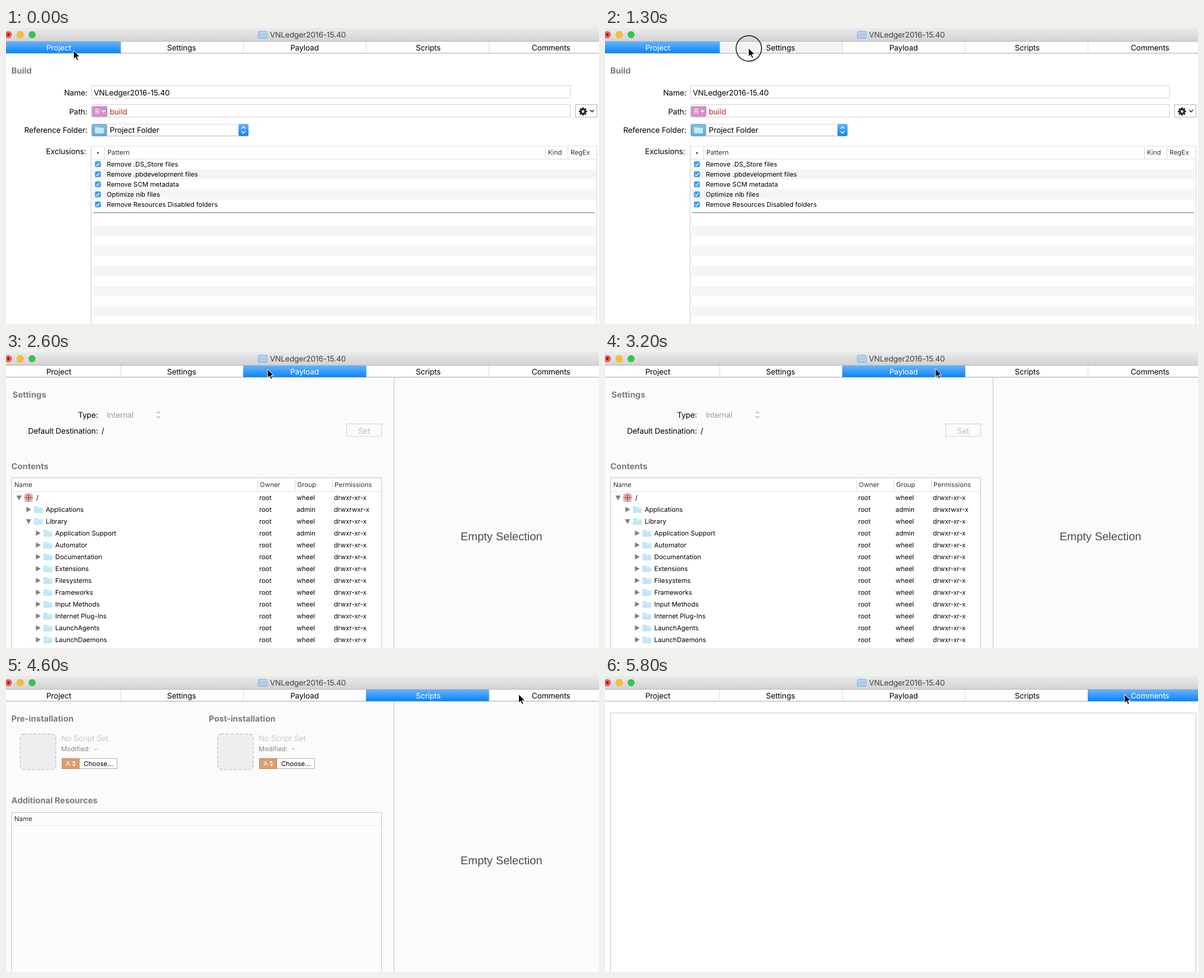
Write an HTML page that moves like this. It is 1000 by 500 pixels and loops after 6000 ms.

```html
<!DOCTYPE html>
<html lang="en">
<head>
<meta charset="utf-8">
<title>Package project</title>
<style>
html, body { margin: 0; width: 100%; height: 100%; overflow: hidden; background: #fff; }
svg { display: block; width: 1000px; height: 500px; }
text { font-family: Inter, "Open Sans", sans-serif; white-space: pre; text-rendering: geometricPrecision; }
</style>
</head>
<body>
<svg id="stage" viewBox="0 0 1000 500" xmlns="http://www.w3.org/2000/svg"></svg>
<script>
const LOOP = 6000, STEP = 100;
const PROJECT = 'VNLedger2016';
const TABS = [['Project', 0, 193, 89], ['Settings', 193, 400, 296], ['Payload', 400, 607, 503.5],
  ['Scripts', 607, 814, 712], ['Comments', 814, 1000, 919]];

// Drawing helpers: text is placed by the middle of its capitals.
const text = (x, y, s, o = {}) => {
  const size = o.size || 13;
  return `<text x="${x}" y="${y + size * 0.36}" font-size="${size}" fill="${o.fill || '#000'}"
    text-anchor="${o.anchor || 'start'}" font-weight="${o.weight || 400}"
    letter-spacing="${size === 13 ? -0.14 : 0}" ${o.attrs || ''}>${s}</text>`;
};
const small = (x, y, s, fill = '#000') => text(x, y, s, { size: 11, fill });
const label = (x, y, s) => text(x, y, s, { anchor: 'end' });
const heading = (x, y, s) => text(x, y, s, { size: 14, weight: 700, fill: '#7c7c7c' });
const rect = (x, y, w, h, fill, attrs = '') =>
  `<rect x="${x}" y="${y}" width="${w}" height="${h}" fill="${fill}" ${attrs}/>`;
const box = (x, y, w, h, stroke = '#d2d2d2', fill = '#fff') =>
  rect(x + .5, y + .5, w - 1, h - 1, fill, `stroke="${stroke}"`);
const path = (d, stroke, width = 1, fill = 'none') =>
  `<path d="${d}" fill="${fill}" stroke="${stroke}" stroke-width="${width}"/>`;
const hline = (x1, x2, y, c) => path(`M${x1} ${y}H${x2}`, c);
const vline = (x, y1, y2, c) => path(`M${x} ${y1}V${y2}`, c);
const list = (n, fn) => Array.from({ length: n }, (_, i) => fn(i)).join('');

const chevrons = (x, y, c, w = 1.4) =>
  path(`M${x - 3.2} ${y - 2.3}l3.2 -3.2l3.2 3.2M${x - 3.2} ${y + 2.3}l3.2 3.2l3.2 -3.2`, c, w);
const field = (x, y, w, h, s) => box(x, y, w, h) + text(x + 4, y + 12, s);
const popup = (x, y, w, s, tx) =>
  rect(x + .5, y + .5, w - 1, 19.5, '#fff', 'rx="3" stroke="#dcdcdc"') +
  hline(x + 2, x + w - 2, y + 20.5, '#c6c6c6') +
  rect(x + w - 17, y, 17, 20.5, 'url(#cap)', 'rx="3"') +
  chevrons(x + w - 8.5, y + 10.2, '#fff') + text(tx, y + 10.5, s);
const check = (x, y, size, on) => on
  ? rect(x, y, size, size, '#419df5', 'rx="2.5"') +
    path(`M${x + size * .23} ${y + size * .53}l${size * .2} ${size * .23}l${size * .34} ${-size * .5}`, '#fff', size / 8)
  : rect(x + .5, y + .5, size - 1, size - 1, '#fff', 'rx="2.5" stroke="#c8c8c8"');
const folder = (x, y, w = 15, h = 11) =>
  rect(x, y, w * .45, 3, '#aeddf3', 'rx="1"') + rect(x, y + 1.5, w, h - 1.5, '#c0e7f9', 'rx="1"') +
  hline(x, x + w, y + 3, '#daf1fb');
const triangle = (x, y, open) => path(open
  ? `M${x - 4.5} ${y - 3.5}h9l-4.5 8z` : `M${x - 3.5} ${y - 4.5}v9l8 -4.5z`, 'none', 0, '#7d7d7d');

function gear(x, y) {
  const teeth = list(8, i => rect(x - 1.4, y - 7, 2.8, 4, '#222', `transform="rotate(${i * 45} ${x} ${y})"`));
  return teeth + `<circle cx="${x}" cy="${y}" r="3.7" fill="none" stroke="#222" stroke-width="2.8"/>`;
}

function projectPage() {
  const rows = ['Remove .DS_Store files', 'Remove .pbdevelopment files', 'Remove SCM metadata',
    'Optimize nib files', 'Remove Resources Disabled folders'];
  return heading(9, 72, 'Build') +
    label(137, 109, 'Name:') + field(144, 97, 808, 22, PROJECT + '-15.40') +
    label(137, 141, 'Path:') + box(144, 129, 808, 22) +
    rect(145, 132, 26, 18, '#d68fcb', 'rx="2"') + text(150, 141, 'R', { size: 12, fill: '#fff' }) +
    path('M161 139.3h7l-3.5 3.8z', 'none', 0, '#fff') + text(175, 141, 'build', { fill: '#b5281c' }) +
    box(960, 129, 37, 22, '#b4b4b4') + gear(973, 141) + path('M985 138.5l3.3 3.3l3.3 -3.3', '#222', 1.5) +
    label(137, 172, 'Reference Folder:') + popup(144, 162, 265, 'Project Folder', 175) +
    rect(145, 162.5, 25, 20, 'url(#well)', 'rx="2" stroke="#7ba3c4"') + folder(150, 167) +
    label(135, 208, 'Exclusions:') +
    hline(143, 997, 199.5, '#e3e3e3') + vline(143.5, 199, 500, '#c9c9c9') + vline(996.5, 199, 500, '#d5d5d5') +
    hline(144, 996, 221.5, '#dedede') +
    [166.5, 909.5, 947.5].map(x => vline(x, 201, 221, '#d8d8d8')).join('') +
    `<circle cx="155" cy="211" r="1.5" fill="#333"/>` +
    small(171, 210, 'Pattern', '#333') + small(914, 210, 'Kind', '#333') + small(952, 210, 'RegEx', '#333') +
    rows.map((s, i) => {
      const y = 230 + 17 * i;
      return (i % 2 ? rect(146, y - 8.5, 849, 17, '#f5f5f5') : '') + check(150, y - 5, 10, true) + small(170, y, s);
    }).join('') +
    rect(147, 311, 846, 1.5, '#9b9b9b') +
    list(5, i => rect(146, 334 + 34 * i, 849, 17, '#f5f5f5'));
}

function settingsPage() {
  const options = ['Require admin password for installation', 'Relocatable',
    'Overwrite directory permissions', 'Follow symbolic links'];
  return heading(9, 72, 'Tag') +
    label(100, 108, 'Identifier:') + field(108, 96, 889, 22, `com.mosswhim.pkg.${PROJECT}-1540`) +
    label(100, 139, 'Version:') + field(108, 128, 255, 22, '1.0') +
    rect(0, 170, 1000, 105, '#f2f2f2') + heading(9, 200, 'Post-installation Behavior') +
    label(100, 245, 'On Success:') + popup(108, 235, 183, 'Do Nothing', 117) +
    heading(9, 305, 'Options') +
    options.map((s, i) => check(108, 329 + 22 * i, 14, i === 0) + text(126, 336 + 22 * i, s)).join('');
}

const inspector = () => rect(0, 43, 1000, 457, '#fbfbfb') + vline(654.5, 43, 500, '#c4c4c4') +
  `<text x="766.5" y="318" font-size="19.1" fill="#4c4c4c" style="font-family:'Liberation Sans',sans-serif">Empty Selection</text>`;

function payloadPage() {
  const names = ['/', 'Applications', 'Library', 'Application Support', 'Automator', 'Documentation', 'Extensions',
    'Filesystems', 'Frameworks', 'Input Methods', 'Internet Plug-Ins', 'LaunchAgents', 'LaunchDaemons'];
  const row = (name, i) => {
    const y = 246 + 20 * i, depth = Math.min(i, 2) - (i === 2 ? 1 : 0), x = 22 + 16 * depth;
    const admin = i === 1 || i === 3;
    const icon = i ? folder(x + 9, y - 5)
      : rect(32, 240, 12, 12, '#f3d9d2', 'stroke="#a8a09c"') +
        path('M30 246h16M38 238v16M34.5 242.5h7v7h-7z', '#c4503e', 1.2) + rect(36.5, 244.5, 3, 3, '#b83827');
    return triangle(x, y, i === 0 || i === 2) + icon + small(i ? x + 29 : 51, y, name) + small(427, y, 'root') +
      small(490, y, admin ? 'admin' : 'wheel') + small(553, y, i === 1 ? 'drwxrwxr-x' : 'drwxr-xr-x');
  };
  return inspector() + heading(11, 72, 'Settings') +
    label(155, 106, 'Type:') + text(170, 106, 'Internal', { fill: '#9c9c9c' }) + chevrons(257, 106, '#a5a5a5', 1.2) +
    label(155, 133, 'Default Destination:') + text(161, 133, '/') +
    box(574, 121, 60, 22, '#d4d4d4', '#fbfbfb') + text(604, 133, 'Set', { fill: '#bdbdbd', anchor: 'middle' }) +
    heading(9, 193, 'Contents') + box(9, 212, 625, 300, '#c6c6c6') + hline(10, 633, 235.5, '#e2e2e2') +
    [424.5, 487.5, 550.5].map(x => vline(x, 215, 234, '#d8d8d8')).join('') +
    small(14, 224, 'Name', '#333') + small(428, 224, 'Owner', '#333') +
    small(491, 224, 'Group', '#333') + small(554, 224, 'Permissions', '#333') + names.map(row).join('');
}

function scriptsPage() {
  const slot = (x, title) => heading(x, 72, title) +
    rect(x + 15, 98, 60, 60, '#eeeeee', 'rx="6" stroke="#c9c9c9" stroke-width="1.5" stroke-dasharray="5 3"') +
    text(x + 84, 105, 'No Script Set', { fill: '#c6c6c6' }) +
    small(x + 84, 123, 'Modified:', '#888') + small(x + 140, 123, '-', '#888') +
    box(x + 85, 139, 94, 18, '#b0b0b0') + rect(x + 85.5, 139.5, 29, 17, '#dd9d70', 'stroke="#b9855f"') +
    small(x + 92, 148, 'A', '#fff') +
    path(`M${x + 102.5} 146.7l3 -3.5l3 3.5zM${x + 102.5} 149.3l3 3.5l3 -3.5z`, 'none', 0, '#fff') +
    small(x + 122, 148, 'Choose...');
  return inspector() + slot(9, 'Pre-installation') + slot(342, 'Post-installation') +
    heading(9, 210, 'Additional Resources') + box(9, 230, 625, 300, '#c6c6c6', '#fcfcfc') +
    hline(10, 633, 252.5, '#e8e8e8') + small(14, 241, 'Name', '#333');
}

const commentsPage = () => box(9, 62, 988, 460, '#c4c4c4');

const gradient = (id, a, b) => `<linearGradient id="${id}" x2="0" y2="1"><stop stop-color="${a}"/>` +
  `<stop offset="1" stop-color="${b}"/></linearGradient>`;
const dot = (x, fill) => `<circle cx="${x}" cy="11.3" r="5.8" fill="${fill}" stroke="#000" stroke-opacity=".12" stroke-width=".8"/>`;
const stage = document.getElementById('stage');
const pages = [projectPage, settingsPage, payloadPage, scriptsPage, commentsPage];

stage.innerHTML = '<defs>' + gradient('bar', '#ebebeb', '#d2d2d2') + gradient('cap', '#66b3fa', '#1a80f5') +
  gradient('tab', '#66b3fb', '#0a84fe') + gradient('well', '#84bce2', '#6ba6d2') +
  gradient('doc', '#b9d6f2', '#9fc4ea') + '</defs>' +
  rect(0, 0, 1000, 500, '#fff') +
  pages.map(p => `<g class="page">${p()}</g>`).join('') +
  rect(0, 0, 1000, 22, 'url(#bar)') + hline(0, 1000, 22.5, '#b9b9b9') +
  dot(4, '#fc5650') + '<circle cx="4" cy="11.3" r="2" fill="#7d0a0a"/>' + dot(24, '#fdbd2f') + dot(44, '#33c748') +
  rect(425.5, 5.5, 15, 12, 'url(#doc)', 'rx="1.5" stroke="#8db4dc"') + hline(427, 439, 14.5, '#c7def4') +
  text(445, 11.5, PROJECT + '-15.40', { fill: '#404040' }) +
  rect(0, 23, 1000, 19, '#fff') + hline(0, 1000, 42.5, '#acacac') +
  TABS.map(([name, a, b, c]) => rect(a, 23, b - a, 19, '#fff', 'class="tab"') +
    (a ? vline(a + .5, 23, 42, '#dcdcdc') : '') +
    text(c, 33.5, name, { anchor: 'middle' })).join('') +
  '<rect id="chosen" y="23" height="19.5" fill="url(#tab)"/>' + '<g id="chosenName"></g>' +
  '<circle id="ring" r="21.5" fill="none" stroke="#111" stroke-width="1.4"/>' +
  '<path id="cursor" d="M0 0V14.5L3.4 11.4L5.8 17L8.2 16L5.8 10.6H10.5Z" fill="#000" stroke="#fff" stroke-width="1" stroke-linejoin="round"/>';

const find = id => document.getElementById(id);
const pageNodes = [...stage.querySelectorAll('.page')];
const tabNodes = [...stage.querySelectorAll('.tab')];
const chosen = find('chosen'), chosenName = find('chosenName'), ring = find('ring'), cursor = find('cursor');

// Pointer strokes: start, end, target x, target y.
const MOVES = [[400, 1200, 242, 34], [1600, 2400, 441, 29], [2640, 3700, 655, 27], [4100, 4680, 876, 31]];
// Each press lasts until release, when the next tab opens.
const PRESSES = [[1200, 1500], [2400, 2600], [3700, 3900], [4800, 5000]];

function pointer(t) {
  let x = 114, y = 38;
  for (const [from, to, tx, ty] of MOVES) {
    const p = Math.min(1, Math.max(0, (t - from) / (to - from)));
    const e = p * p * (3 - 2 * p);
    x += (tx - x) * e;
    y += (ty - y) * e;
  }
  return [x, y];
}

let shown = -1;
function showTab(index) {
  if (index === shown) return;
  shown = index;
  pageNodes.forEach((g, i) => g.setAttribute('display', i === index ? 'inline' : 'none'));
  const [name, a, b, c] = TABS[index];
  chosen.setAttribute('x', a);
  chosen.setAttribute('width', b - a + .5);
  chosenName.innerHTML = text(c, 33.5, name, { anchor: 'middle', fill: '#fff' });
}

function draw(ms) {
  const t = Math.floor((ms % LOOP) / STEP) * STEP;
  const [x, y] = pointer(t);
  const pressed = PRESSES.findIndex(([a, b]) => t >= a && t < b);
  showTab(PRESSES.filter(p => t >= p[1]).length);
  tabNodes.forEach((n, i) => n.setAttribute('fill', pressed >= 0 && i === pressed + 1 ? '#f4f4f4' : '#fff'));
  // The black label under the chosen tab is covered by its blue fill.
  ring.setAttribute('display', pressed >= 0 ? 'inline' : 'none');
  ring.setAttribute('cx', x + .5);
  ring.setAttribute('cy', y + .5);
  cursor.setAttribute('transform', `translate(${x} ${y})`);
}

const start = performance.now();
function frame() {
  draw(performance.now() - start);
  requestAnimationFrame(frame);
}
frame();
</script>
</body>
</html>
```
